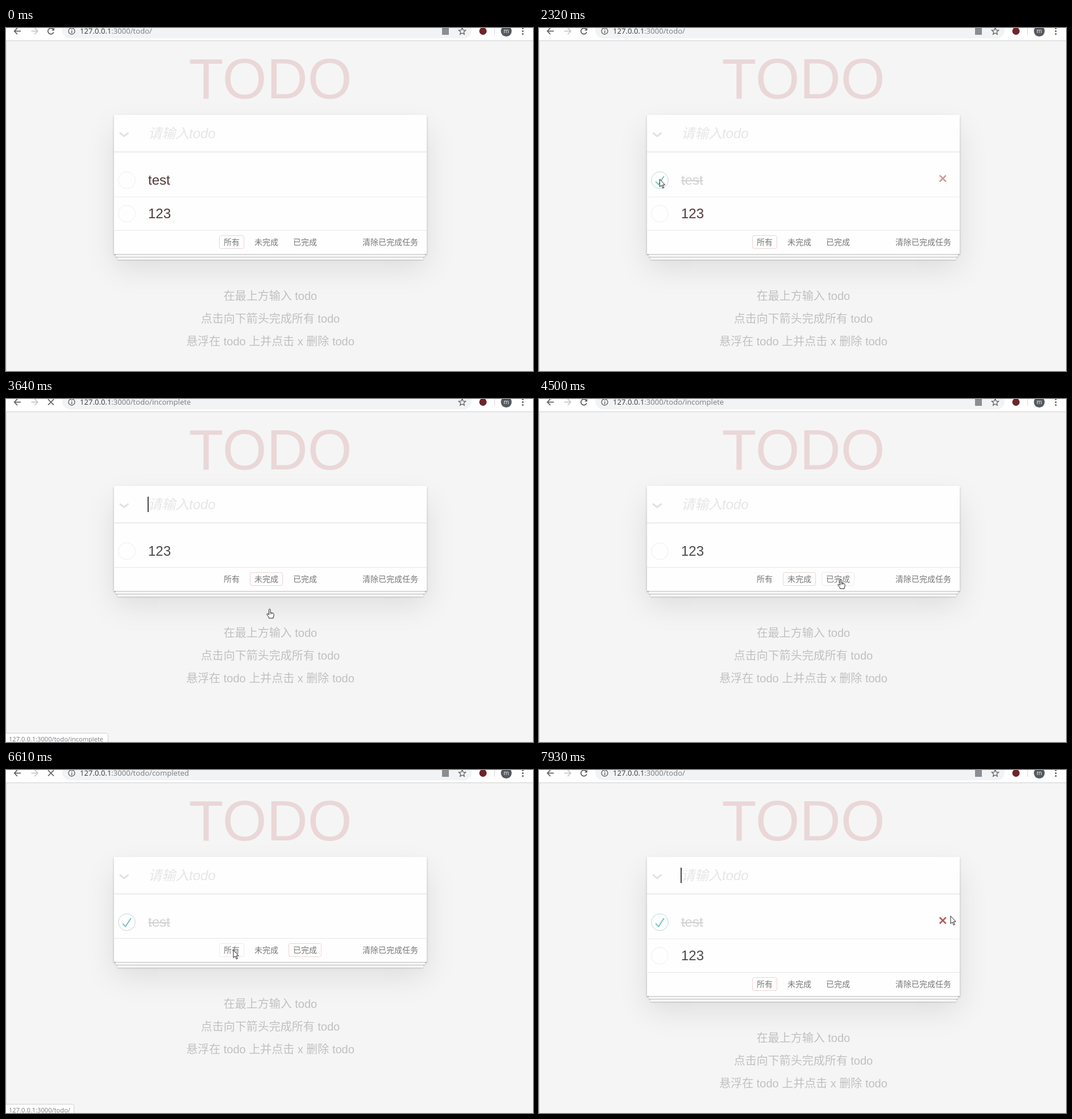
Recreate the animation shown at these times as an HTML page with a canvas. Size 927 by 604 pixels, loop 8000 ms.

```html
<!DOCTYPE html>
<html lang="zh-CN">
<head>
<meta charset="utf-8">
<title>TODO</title>
<style>
html, body { margin: 0; width: 100%; height: 100%; overflow: hidden; background: #f5f5f5; }
canvas { display: block; }
</style>
</head>
<body>
<canvas id="stage" width="927" height="604"></canvas>
<script>
const g = document.getElementById('stage').getContext('2d');
const LOOP = 8000;
const SANS = '"Liberation Sans", "Noto Sans CJK SC", Arial, sans-serif';
const UI = '"Open Sans", "Noto Sans", sans-serif';
const LEFT = 190, TOP = 153, WIDTH = 550;
const HOST = '127.0.0.1';
const FILTERS = [['所有', 375, 44], ['未完成', 429, 58], ['已完成', 497, 58]];
const PATHS = [':3000/todo/', ':3000/todo/incomplete', ':3000/todo/completed'];

// time, x, y of the pointer tip
const POINTER = [
  [220, 330, 447], [430, 252, 325], [610, 196, 186], [760, 208, 232],
  [1000, 238, 281], [1080, 232, 278], [1310, 212, 266], [2320, 212, 266],
  [2620, 320, 306], [2940, 444, 360], [3100, 463, 368], [3170, 464, 370],
  [3990, 464, 370], [4250, 505, 342], [4500, 531, 318], [5820, 531, 318],
  [6200, 460, 320], [6530, 400, 317], [7230, 400, 317], [7600, 585, 283],
  [7930, 724, 257]
];
const CARET_ON = [[1630, 2320], [2850, 3380], [3570, 4260], [4790, 5510], [6030, 6560], [6770, 7300], [7830, 8000]];
const LOADING = [[1460, 1780], [3570, 3730], [4740, 4970], [6540, 6770]];
// start, fade-in length, end, fade-out length, path index
const STATUS = [[3300, 90, 3990, 140, 1], [4620, 90, 5150, 210, 2], [6350, 90, 6680, 1, 0]];

const ARROW = new Path2D('M0 0V13.6L3.1 10.8L5.3 16L7.3 15.1L5.1 10.1H9.2Z');
const HAND = new Path2D('M-1.5 10V1.2a1.3 1.3 0 0 1 2.6 0V6l4 .8q2 .5 2 2.5v2.7l-1 2.6V16H-1.6v-1.4L-5 9.8q-.6-1.7 1-1.9z');
const TICK = new Path2D('M72 25L42 71 27 56l-4 4 20 20 34-52z');

const within = (t, spans) => spans.some(([a, b]) => t >= a && t < b);
const clamp = v => Math.max(0, Math.min(1, v));

function rect(x, y, w, h, color) {
  g.fillStyle = color;
  g.fillRect(x, y, w, h);
}

function shadowRect(x, y, w, h, color, dy, blur, alpha) {
  g.save();
  g.shadowColor = `rgba(0,0,0,${alpha})`;
  g.shadowOffsetY = dy;
  g.shadowBlur = blur;
  rect(x, y, w, h, color);
  g.restore();
}

function text(str, x, y, font, color, align = 'left') {
  g.font = font;
  g.fillStyle = color;
  g.textAlign = align;
  g.fillText(str, x, y);
}

function line(points, color, width) {
  g.beginPath();
  points.forEach(([x, y]) => g.lineTo(x, y));
  g.strokeStyle = color;
  g.lineWidth = width;
  g.stroke();
}

function circle(x, y, r, fill, stroke, width = 1) {
  g.beginPath();
  g.arc(x, y, r, 0, Math.PI * 2);
  if (fill) { g.fillStyle = fill; g.fill(); }
  if (stroke) { g.strokeStyle = stroke; g.lineWidth = width; g.stroke(); }
}

function rounded(x, y, w, h, r, fill, stroke) {
  g.beginPath();
  g.roundRect(x, y, w, h, r);
  if (fill) { g.fillStyle = fill; g.fill(); }
  if (stroke) { g.strokeStyle = stroke; g.lineWidth = 1; g.stroke(); }
}

function cross(x, y, r, color, width) {
  line([[x - r, y - r], [x + r, y + r]], color, width);
  line([[x + r, y - r], [x - r, y + r]], color, width);
}

function address(path, x, y, size, hostColor) {
  const font = size + 'px ' + UI;
  text(HOST, x, y, font, hostColor);
  text(path, x + g.measureText(HOST).width, y, font, '#777b80');
}

function arrowIcon(x, dir, color) {
  line([[x - 5.5, 5.5], [x + 5.5, 5.5]], color, 1.7);
  line([[x + dir * .5, 0], [x + dir * 5.8, 5.5], [x + dir * .5, 11]], color, 1.7);
}

function star(x, y) {
  g.beginPath();
  for (let i = 0; i < 10; i++) {
    const a = -Math.PI / 2 + i * Math.PI / 5, r = i % 2 ? 2.9 : 6.4;
    g.lineTo(x + r * Math.cos(a), y + r * Math.sin(a));
  }
  g.closePath();
  g.strokeStyle = '#5f6368';
  g.lineWidth = 1.3;
  g.stroke();
}

function toolbar(s) {
  const ink = '#5a5d61';
  rect(0, 0, 927, 22, '#fff');
  rect(0, 22, 927, 1, '#cfcfcf');
  rounded(99, -9, 720, 27, 13.5, '#f1f3f4');
  arrowIcon(20.5, -1, ink);
  arrowIcon(50, 1, '#c3c5c7');
  if (s.loading) {
    cross(79, 5.5, 5, ink, 1.7);
  } else {
    g.beginPath();
    g.arc(79, 5.5, 5.2, .35, 5.5);
    g.strokeStyle = ink;
    g.lineWidth = 1.7;
    g.stroke();
    g.fillStyle = ink;
    g.fill(new Path2D('M85 -.5V4.5H80Z'));
  }
  circle(115.5, 5.5, 5.5, null, ink, 1.3);
  rect(115, 5, 1.4, 4, ink);
  rect(115, 2.3, 1.4, 1.5, ink);
  address(PATHS[s.page], 130, 10, 13.1, '#35383c');
  if (!s.hideIcon) rect(767, 0, 12, 12, '#8a8d91');
  star(802.5, 6);
  circle(839, 5.5, 6.5, '#6d2529');
  rect(859, 0, 1, 12, '#d5d6d8');
  circle(880, 5.5, 9.5, '#555a60');
  text('m', 880, 9, '10px ' + UI, '#fff', 'center');
  [.5, 5.5, 10.5].forEach(y => circle(909, y, 1.5, ink));
}

function card(bottom) {
  const h = bottom - TOP;
  shadowRect(LEFT, TOP, WIDTH, h, '#fff', 25, 50, .1);
  shadowRect(LEFT, TOP, WIDTH, h, '#fff', 2, 4, .2);
  shadowRect(LEFT + 6, bottom, WIDTH - 12, 10, '#f6f6f6', 1, 2, .2);
  shadowRect(LEFT + 3, bottom, WIDTH - 6, 5, '#f6f6f6', 1, 1, .2);
  shadowRect(LEFT, bottom - 40, WIDTH, 40, '#fff', 1, 1, .2);
  rect(LEFT, TOP, WIDTH, h, '#fefefe');
}

function item(label, y, done, s) {
  const x = 212.5;
  circle(x, y, 14.8, null, done ? '#bddad5' : '#ededed', 1);
  if (done) {
    g.save();
    g.translate(x, y);
    g.scale(.2963, .2963);
    g.translate(-50, -50);
    g.fillStyle = s.t < 3570 ? '#5dc2af' : '#65bdb9';
    g.fill(TICK);
    g.restore();
  }
  const color = done ? '#d2d2d2' : s.t < 3570 ? '#533a3a' : '#4a4a4a';
  text(label, 250, y + 8, '24px ' + SANS, color);
  if (done) rect(250, y, g.measureText(label).width, 2, color);
  if (s.hoverRow === y) cross(710.3, y - 3, 5.5, s.x > 692 ? '#af5b5e' : '#cc9a9a', 2.5);
}

function info(shift) {
  const lines = ['在最上方输入 todo', '点击向下箭头完成所有 todo', '悬浮在 todo 上并点击 x 删除 todo'];
  lines.forEach((str, i) => {
    const y = 479 + i * 40 - shift;
    text(str, 465, y + 1, '300 20px ' + SANS, 'rgba(255,255,255,.5)', 'center');
    text(str, 465, y, '300 20px ' + SANS, '#bfbfbf', 'center');
  });
}

function footer(s) {
  const y = 365 - s.shift;
  rect(LEFT, 356 - s.shift, WIDTH, 1, '#e6e6e6');
  FILTERS.forEach(([label, x, w], i) => {
    if (i === s.page) rounded(x + .5, y + .5, w - 1, 23, 3, null, 'rgba(175,47,47,.2)');
    else if (i === s.link) rounded(x + .5, y + .5, w - 1, 23, 3, null, 'rgba(175,47,47,.1)');
    text(label, x + 8, y + 17, '300 14px ' + SANS, '#777');
  });
  text('清除已完成任务', 627, y + 17, '300 14px ' + SANS, '#777');
}

function statusBar(t) {
  for (const [start, fadeIn, end, fadeOut, i] of STATUS) {
    const alpha = Math.min(clamp((t - start) / fadeIn), 1 - clamp((t - end) / fadeOut));
    if (alpha <= 0) continue;
    g.globalAlpha = alpha;
    rounded(-5.5, 588.5, [125, 185, 174][i], 30, 3, '#fff', '#d0d0d0');
    address(PATHS[i], 5, 603, 11.15, '#777b80');
    g.globalAlpha = 1;
  }
}

function pointerAt(t) {
  let i = 0;
  while (i < POINTER.length - 1 && POINTER[i + 1][0] <= t) i++;
  const a = POINTER[i], b = POINTER[i + 1] || a;
  const k = b === a ? 0 : clamp((t - a[0]) / (b[0] - a[0]));
  return [a[1] + (b[1] - a[1]) * k, a[2] + (b[2] - a[2]) * k];
}

function stateAt(t) {
  const page = t < 3570 || t >= 6680 ? 0 : t < 4970 ? 1 : 2;
  const shift = page ? 60 : 0;
  const [x, y] = pointerAt(t);
  const shown = t >= 220;
  // hover is stale after a page load until the pointer moves again
  const stale = within(t, [[1780, 2320], [3570, 3990], [6680, 7230]]);
  const live = shown && !stale;
  const top = 365 - shift;
  const link = live ? FILTERS.findIndex(f => x >= f[1] && x <= f[1] + f[2] && y >= top && y <= top + 24) : -1;
  const inCard = live && x > LEFT && x < LEFT + WIDTH;
  const hoverRow = !inCard ? 0 : y > 238 && y < 297 ? 268 : !page && y >= 297 && y < 356 ? 327 : 0;
  return {
    t, x, y, page, shift, shown, link, hoverRow,
    hand: within(t, [[3570, 3990]]) || (link >= 0 && t < 6530),
    loading: within(t, LOADING),
    hideIcon: within(t, [[3570, 3730]]),
    caret: within(t, CARET_ON),
    done: t >= 1780
  };
}

function pointer(s) {
  if (!s.shown) return;
  const shape = s.hand ? HAND : ARROW;
  g.save();
  g.translate(s.x, s.y);
  g.fillStyle = '#fff';
  g.fill(shape);
  g.strokeStyle = '#222';
  g.lineWidth = 1;
  g.lineJoin = 'round';
  g.stroke(shape);
  if (s.hand) {
    line([[1.2, 6], [1.2, 9]], '#222', .8);
    line([[3.6, 7], [3.6, 9]], '#222', .8);
  }
  g.restore();
}

function draw(t) {
  const s = stateAt(t);
  rect(0, 0, 927, 604, '#f5f5f5');
  text('TODO', 465, 123.5, '100px ' + SANS, 'rgba(175,47,47,.15)', 'center');
  info(s.shift);
  card(s.page ? 338 : 398);

  line([[200, 184.5], [207.8, 190.5], [215.6, 184.5]], '#e2e2e2', 3);
  text('请输入todo', 250, 194, 'italic 300 24px ' + SANS, '#e6e6e6');
  rect(LEFT, 216, WIDTH, 2, '#f8f8f8');
  rect(LEFT, 218, WIDTH, 1, '#e2e2e2');
  if (s.caret) rect(249, 172, 2, 27, '#444');

  if (s.page === 1) {
    item('123', 268, false, s);
  } else {
    item('test', 268, s.done, s);
    if (s.page === 0) {
      rect(LEFT, 297, WIDTH, 1, '#ededed');
      item('123', 327, false, s);
    }
  }
  footer(s);
  rect(0, 23, 1, 581, '#d8d8d8');
  toolbar(s);
  statusBar(t);
  pointer(s);
}

function frame(now) {
  draw(now % LOOP);
  requestAnimationFrame(frame);
}
requestAnimationFrame(frame);
</script>
</body>
</html>
```
